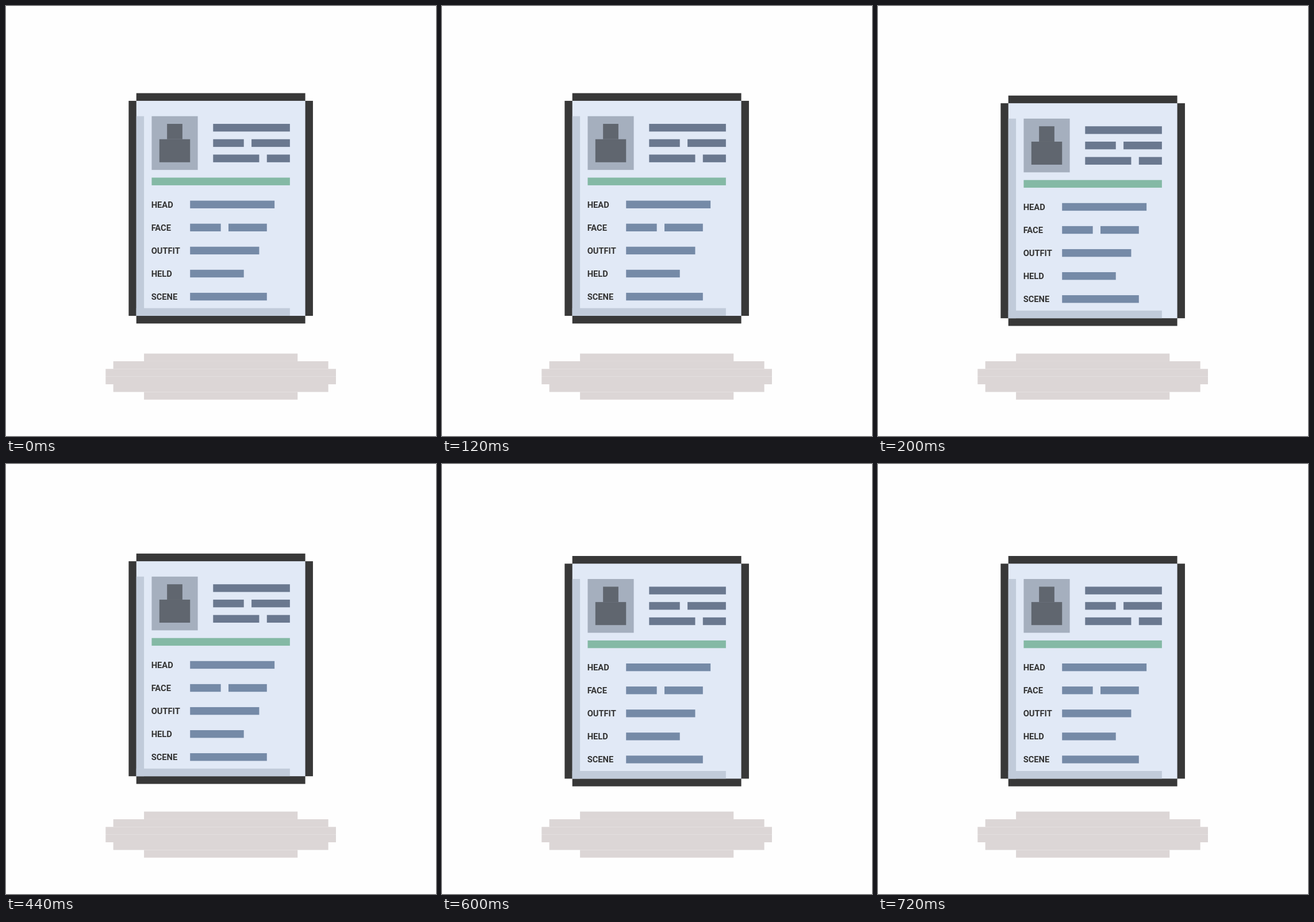
Write an HTML page with a canvas that moves like this. It is 748 px wide and 748 px high and loops after 0.8 s.

```html
<!DOCTYPE html>
<html lang="en">
<head>
<meta charset="utf-8">
<title>Floating profile card</title>
<style>
  html, body { margin: 0; width: 100%; height: 100%; overflow: hidden; background: #fefefe; }
  canvas { display: block; width: 748px; height: 748px; }
</style>
</head>
<body>
<canvas id="stage" width="748" height="748"></canvas>
<script>
const ctx = document.getElementById('stage').getContext('2d');
const SIZE = 748;
const UNIT = SIZE / 56;
const CENTER = SIZE / 2 - 0.35;
const LOOP = 800;

// Positions and sizes are in grid units.
function box(color, x, y, w, h) {
  ctx.fillStyle = color;
  ctx.fillRect(x * UNIT, y * UNIT, w * UNIT, h * UNIT);
}

// A line of bars, one per word, with a one-unit gap between words.
function words(color, x, y, lengths) {
  for (const length of lengths) {
    box(color, x, y, length, 1);
    x += length + 1;
  }
}

// A stepped ellipse, six rows high.
function shadow() {
  for (let row = 0; row < 6; row++) {
    const half = Math.round(15.3 * Math.sqrt(1 - ((row - 2.5) / 3.35) ** 2));
    box('#dcd6d6', -half, row, 2 * half, 1);
  }
}

function sheet() {
  box('#383838', -11, 0, 22, 30);
  box('#383838', -12, 1, 24, 28);
  box('#e1e9f6', -11, 1, 22, 28);
  box('#c1cbda', -11, 3, 1, 26);
  box('#c1cbda', -11, 28, 20, 1);
}

function header() {
  box('#a5afbe', -9, 3, 6, 7);
  box('#60666f', -7, 4, 2, 2);
  box('#60666f', -8, 6, 4, 3);
  for (let i = 0; i < 3; i++) {
    const first = 2 + 2 * i;
    words('#6a788f', -1, 4 + 2 * i, i ? [first, 9 - first] : [10]);
  }
  box('#84b9a5', -9, 11, 18, 1);
}

const traits = { HEAD: [11], FACE: [4, 5], OUTFIT: [9], HELD: [7], SCENE: [10] };

function details() {
  ctx.font = 'bold 14.7px Roboto, sans-serif';
  Object.entries(traits).forEach(([label, lengths], i) => {
    const y = 14 + 3 * i;
    words('#758aa7', -4, y, lengths);
    ctx.fillStyle = '#333';
    ctx.fillText(label, -9 * UNIT - 0.8, (y + 0.9) * UNIT);
  });
}

function place(y, ...parts) {
  ctx.setTransform(1, 0, 0, 1, CENTER, y);
  parts.forEach(part => part());
}

function frame() {
  // The card drops in hard steps, then jumps back up.
  const step = Math.round(performance.now() % LOOP / 400);
  ctx.resetTransform();
  ctx.clearRect(0, 0, SIZE, SIZE);
  place(604.6, shadow);
  place(151.6 + 4.2 * step, sheet, header, details);
  requestAnimationFrame(frame);
}
frame();
</script>
</body>
</html>
```
